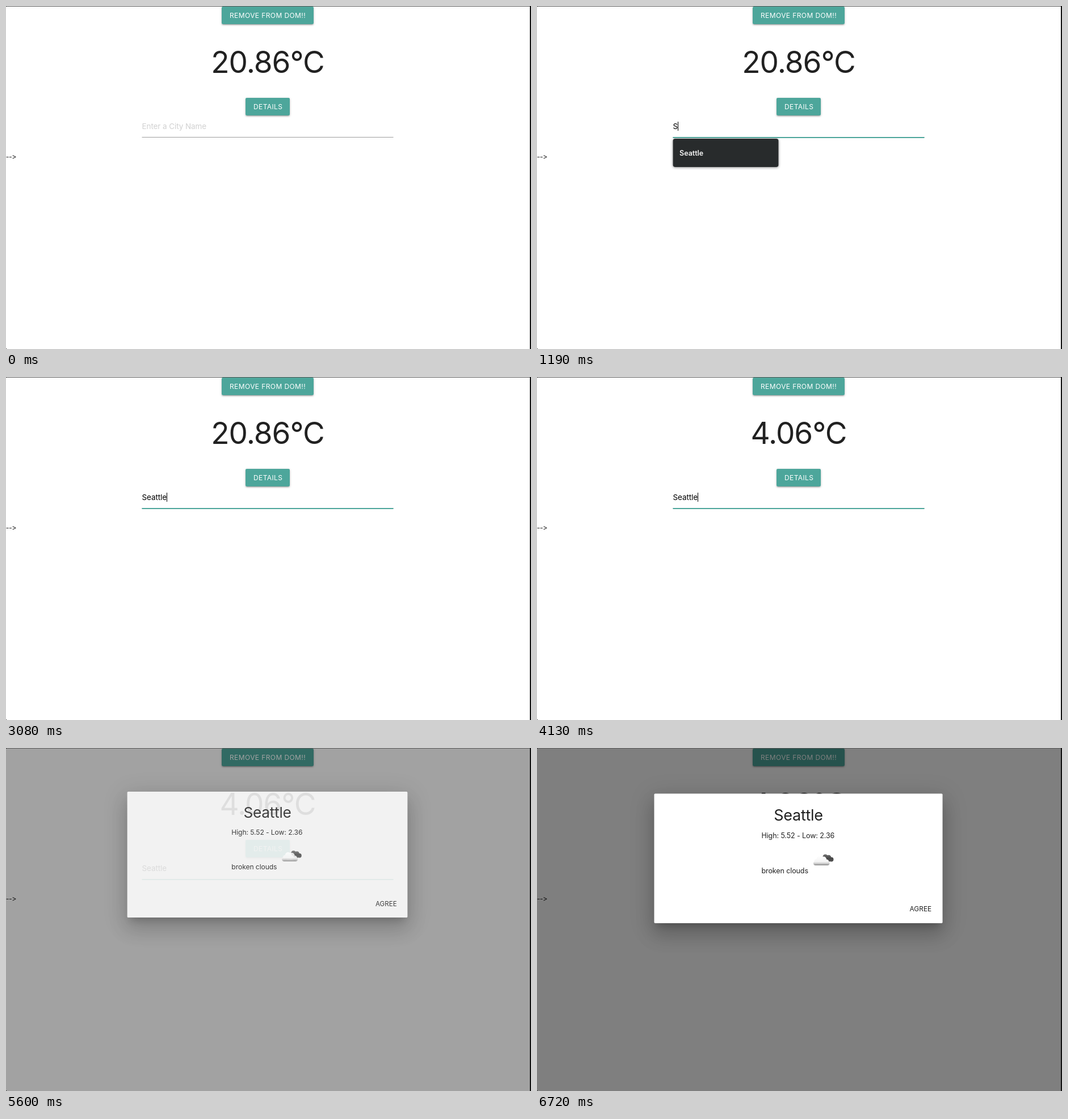
Write an HTML page with a canvas that moves like this. It is 925 by 605 pixels and loops after 7420 ms.

```html
<!DOCTYPE html>
<html lang="en">
<head>
<meta charset="utf-8">
<title>Weather</title>
<style>
html, body { margin: 0; width: 100%; height: 100%; overflow: hidden; background: #fff; }
canvas { display: block; }
</style>
</head>
<body>
<canvas id="stage" width="925" height="605"></canvas>
<script>
const W = 925, H = 605, LOOP = 7420, STEP = 70;
const ctx = document.getElementById('stage').getContext('2d');
const TEAL = [77, 166, 155], TEAL_HOVER = [91, 188, 176];
const INK = '#212121';
const CITIES = ['los angeles', 'ny', 'Dubai', 'dxb', 'Glasgow', 'Seattle'];

// Moments at which each letter of the city is typed
const KEYS = [1050, 1400, 1540, 1960, 2100, 2800, 3010];
const CARET_ON = [[140, 700], [1050, 2660], [2800, 3570], [4130, 4620], [5180, 5530]];

const clamp = v => Math.max(0, Math.min(1, v));
const ramp = (t, from, to) => clamp((t - from) / (to - from));
const easeOut = (k, power) => 1 - Math.pow(1 - k, power);
const mix = (a, b, k) => `rgb(${a.map((v, i) => Math.round(v + (b[i] - v) * k))})`;

function font(size, spacing = 0, weight = 400) {
  ctx.font = `${weight} ${size}px Inter, Roboto, sans-serif`;
  ctx.letterSpacing = spacing + 'px';
}

function text(str, x, y, color, align = 'left') {
  ctx.fillStyle = color;
  ctx.textAlign = align;
  ctx.fillText(str, x, y);
}

function box(x, y, w, h, r, color) {
  ctx.fillStyle = color;
  ctx.beginPath();
  ctx.roundRect(x, y, w, h, r);
  ctx.fill();
}

// Outer shadow only, like a CSS box-shadow: [dy, blur, spread, alpha]
function shadow(x, y, w, h, r, layers) {
  const far = 3000;
  ctx.save();
  ctx.beginPath();
  ctx.rect(-200, -200, W + 400, H + 400);
  ctx.roundRect(x, y, w, h, r);
  ctx.clip('evenodd');
  for (const [dy, blur, spread, alpha] of layers) {
    const scale = ctx.getTransform().a;
    ctx.shadowColor = `rgba(0,0,0,${alpha})`;
    ctx.shadowBlur = blur;
    ctx.shadowOffsetX = far * scale;
    ctx.shadowOffsetY = dy;
    box(x - spread - far, y - spread, w + 2 * spread, h + 2 * spread, Math.max(r, r + spread), '#000');
  }
  ctx.restore();
}

function button(label, x, y, w, color) {
  shadow(x, y, w, 31, 2, [[1.7, 1.7, 0, .14], [2.6, 1, -1.7, .12], [1, 4.3, 0, .2]]);
  box(x, y, w, 31, 2, color);
  font(12, .4);
  text(label, x + 14, y + 19.5, '#fff');
}

function field(t) {
  const typed = 'Seattle'.slice(0, KEYS.filter(k => t >= k).length);
  font(13.5, -.1);
  text(typed || 'Enter a City Name', 239.5, 217, typed ? '#000' : '#d1d1d1');

  if (CARET_ON.some(([a, b]) => t >= a && t < b)) {
    const x = Math.round(239.2 + (typed ? ctx.measureText(typed).width : 0));
    ctx.fillStyle = '#000';
    ctx.fillRect(x, 204, 1, 16);
  }

  ctx.fillStyle = '#9e9e9e';
  ctx.fillRect(239.5, 231, 443, 1);
  ctx.globalAlpha = ramp(t, 70, 420);
  ctx.fillStyle = mix(TEAL, TEAL, 0);
  ctx.fillRect(239.5, 231, 443, 2);
  ctx.globalAlpha = 1;
}

function suggestions(t) {
  if (t < 280 || t >= 3080) return;
  const items = t < 1120 ? CITIES : CITIES.slice(-1);
  const h = 50 + 35 * (items.length - 1);
  shadow(239.5, 234, 186, h, 4, [[1, 4, 0, .45]]);
  box(239.5, 234, 186, h, 4, '#282b2c');
  font(12.5, 0, 600);
  items.forEach((name, i) => text(name, 251, 263.5 + 35 * i, '#f5f5f5'));
}

function puffs(color, list) {
  ctx.fillStyle = color;
  ctx.beginPath();
  for (const [x, y, r] of list) {
    ctx.moveTo(x + r, y);
    ctx.arc(x, y, r, 0, 7);
  }
  ctx.fill();
}

function cloud() {
  const dark = ctx.createLinearGradient(0, 187, 0, 202);
  dark.addColorStop(0, '#777');
  dark.addColorStop(.5, '#484848');
  dark.addColorStop(1, '#555');
  puffs(dark, [[508, 192, 4.5], [514, 193, 4.2], [518.5, 196.5, 4], [512, 198, 4]]);

  const light = ctx.createLinearGradient(0, 189, 0, 207);
  light.addColorStop(0, '#fff');
  light.addColorStop(.65, '#f4f4f4');
  light.addColorStop(.85, '#c4c4c4');
  light.addColorStop(1, '#858585');
  puffs(light, [[498, 196, 5.5], [505, 196.5, 5], [493, 200, 4.5], [510, 201, 4.5]]);
  box(487, 199.5, 28.5, 7.5, 3.7, light);
}

function modal(t) {
  if (t < 5600) return;
  const k = ramp(t, 5480, 5730);
  ctx.fillStyle = `rgba(0,0,0,${.5 * easeOut(k, 2)})`;
  ctx.fillRect(0, 0, W, H);

  const p = easeOut(k, 3), scale = .8 + .2 * p;
  const cx = 460.5, cy = 194.5;
  ctx.save();
  ctx.globalAlpha = p;
  ctx.translate(cx, cy - 48 * (1 - p));
  ctx.scale(scale, scale);
  ctx.translate(-cx, -cy);

  shadow(206.5, 80.5, 508, 228.5, 2, [[21, 33, 2.6, .14], [8, 40, 7, .12], [9.5, 13, -6, .2]]);
  box(206.5, 80.5, 508, 228.5, 1.7, '#fff');
  font(27, -.3);
  text('Seattle', cx, 128, INK, 'center');
  font(12.5, -.1);
  text('High: 5.52 - Low: 2.36', 395.5, 159, INK);
  text('broken clouds', 395.5, 221, INK);
  cloud();
  font(11.8, .1);
  text('AGREE', 656.5, 288, INK);
  ctx.restore();
}

function draw(t) {
  ctx.fillStyle = '#fff';
  ctx.fillRect(0, 0, W, H);

  button('REMOVE FROM DOM!!', 380, 1, 162, mix(TEAL, TEAL, 0));
  font(53, -1);
  text(t < 3780 ? '20.86°C' : '4.06°C', 461, 117.5, INK, 'center');
  button('DETAILS', 422, 162, 78, mix(TEAL, TEAL_HOVER, ramp(t, 4970, 5250)));
  field(t);

  // Drawn one by one so the font does not join them into an arrow
  font(12.5);
  [...'-->'].forEach((c, i) => text(c, -.3 + 5.3 * i, 270, INK));

  suggestions(t);
  modal(t);

  // Window edges
  ctx.fillStyle = '#5c5c5c';
  ctx.fillRect(0, 0, W, 1);
  ctx.fillStyle = '#111';
  ctx.fillRect(923, 0, 2, H);
  ctx.fillRect(0, 0, 1, 1);
  ctx.fillRect(0, H - 1, 1, 1);
}

const start = performance.now();
function frame() {
  const t = (performance.now() - start) % LOOP;
  draw(Math.floor(t / STEP) * STEP);
  requestAnimationFrame(frame);
}
frame();
</script>
</body>
</html>
```
